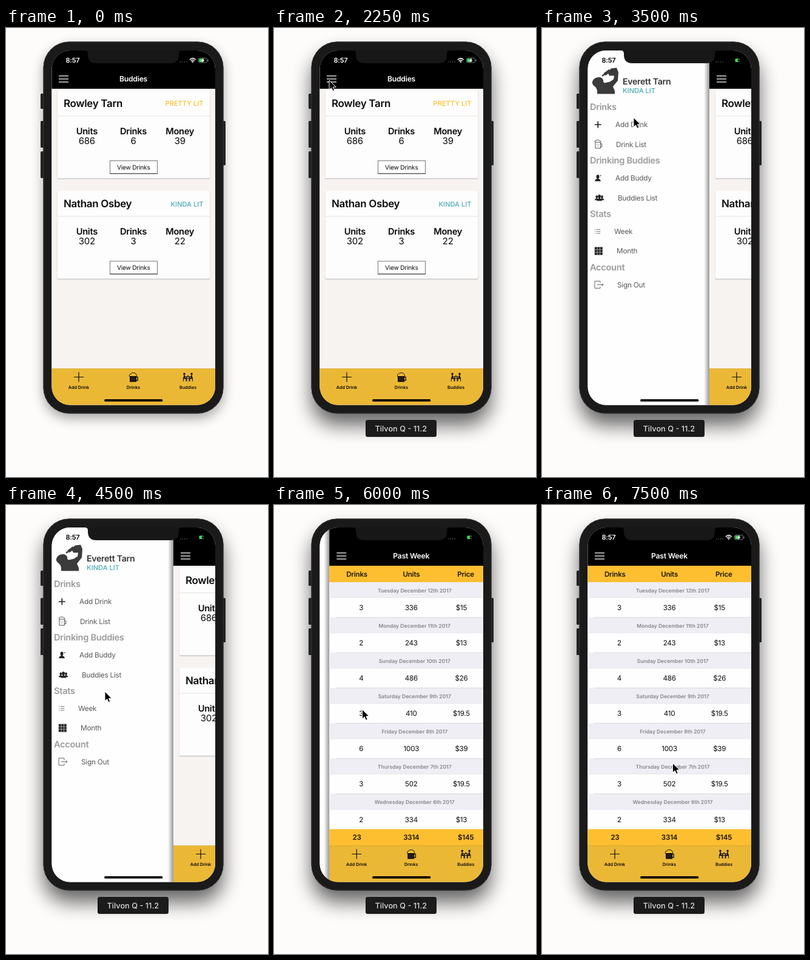
An HTML page for the animation above (8 s loop, 432 by 739 pixels).

```html
<!DOCTYPE html>
<html lang="en">
<head>
<meta charset="utf-8">
<title>Drinks tracker</title>
<style>
html, body { margin: 0; width: 100%; height: 100%; overflow: hidden; background: #fefcfb; }
svg { display: block; width: 100vw; height: 100vh; }
text { font-family: Inter, "Open Sans", sans-serif; text-rendering: geometricPrecision; white-space: pre; }
</style>
</head>
<body>
<svg id="stage" viewBox="0 0 432 739"></svg>
<script>
const LOOP = 8000, STEP = 250, OPEN = 201;
const YELLOW = '#fdbf2f', TAB = '#ebb836', TEAL = '#4bacb4', GREY = '#9b9b9b';

const text = (x, y, size, str, o = {}) =>
  `<text x="${x}" y="${y}" font-size="${size}" font-weight="${o.w || 400}" fill="${o.fill || '#0a0a0a'}"` +
  ` text-anchor="${o.at || 'start'}" letter-spacing="${o.ls ?? -0.02 * size}">${str}</text>`;
const mid = (x, y, size, str, o = {}) => text(x, y, size, str, { at: 'middle', ...o });
const rect = (x, y, w, h, fill, r = 0, more = '') =>
  `<rect x="${x}" y="${y}" width="${w}" height="${h}" rx="${r}" fill="${fill}" ${more}/>`;
const line = (d, color, w = 1, more = '') =>
  `<path d="${d}" fill="none" stroke="${color}" stroke-width="${w}" ${more}/>`;
const shape = (d, fill = '#111') => `<path d="${d}" fill="${fill}"/>`;
const dot = (x, y, r, fill = '#111') => `<circle cx="${x}" cy="${y}" r="${r}" fill="${fill}"/>`;
const group = (id, body, more = '') => `<g id="${id}" ${more}>${body}</g>`;

// Main pages
const header = title => rect(75, 36, 271, 64, '#000') +
  line('M87 78.8h16M87 83.8h16M87 88.8h16', '#fff', 1.3) +
  mid(210, 88.2, 12.2, title, { w: 600, fill: '#fff' });

function card(y, name, state, color, values) {
  const cols = ['Units', 'Drinks', 'Money'].map((label, i) => {
    const x = 133.3 + i * 76.7;
    return mid(x, 72, 14.7, label, { w: 600 }) + mid(x, 87.5, 15, values[i]);
  }).join('');
  return `<g transform="translate(0 ${y})">` +
    rect(84, 0.5, 253, 145, '#000', 1, 'opacity=".06"') +
    rect(85, 1, 251, 145, '#000', 1, 'opacity=".12"') +
    rect(85, 0, 251, 144.3, '#fefdfd', 1) +
    line('M85 41.7h251', '#e4e1e0') +
    text(95, 27.2, 17, name, { w: 600 }) +
    text(325.5, 25.3, 11.1, state, { w: 500, fill: color, at: 'end', ls: 0 }) + cols +
    rect(171.5, 115.5, 78, 21, '#fefefe', 0, 'stroke="#777" stroke-width="1"') +
    line('M171 136.7h79', '#444', 1.2) +
    mid(210.3, 130, 10.1, 'View Drinks') + '</g>';
}

const tabMug = shape('M204 573h11v9.5h-11z') +
  line('M215 574.5h2.2v5.5h-2.2', '#111', 1.3) +
  line('M203.8 573.5q-1.5-4 2-4 1.5-3 4-1.8 3-1 3.5 1.3 3 .5 1.7 4.5z', '#111', 1) +
  line('M207 575v5.5M209.7 575v5.5M212.4 575v5.5', '#5b4a18', 0.7);
const tabPeople = dot(294, 569.3, 1.7) + dot(306, 569.3, 1.7) +
  line('M294 571.5v5h3.5v5M306 571.5v5h-3.5v5', '#111', 2) +
  line('M294 573l4 1.5 2-2 2 2 4-1.5', '#111', 1.3) +
  line('M292.4 575v6.5M307.6 575v6.5M298 576.5h4', '#111', 1);
const tabs = rect(75, 560.5, 271, 62, TAB) + line('M75 560.7h271', '#c99f35', 0.5) +
  line('M112 574.5h16M120 566.5v16', '#111', 1.2) + tabMug + tabPeople +
  ['Add Drink', 'Drinks', 'Buddies'].map((s, i) =>
    mid(120 + i * 90, 593.6, 7.2, s, { w: 600, ls: 0 })).join('');

const buddies = rect(75, 99, 271, 462, '#f7f3f1') +
  card(103, 'Rowley Tarn', 'PRETTY LIT', YELLOW, [686, 6, 39]) +
  card(268.3, 'Nathan Osbey', 'KINDA LIT', TEAL, [302, 3, 22]) + header('Buddies');

const days = [
  ['Tuesday December 12th', 3, 336, 15], ['Monday December 11th', 2, 243, 13],
  ['Sunday December 10th', 4, 486, 26], ['Saturday December 9th', 3, 410, 19.5],
  ['Friday December 8th', 6, 1003, 39], ['Thursday December 7th', 3, 502, 19.5],
  ['Wednesday December 6th', 2, 334, 13]
];
const totals = (y, cells) => cells.map((s, i) =>
  mid(120.3 + i * 89.8, y, 11.6, s, { w: 600, fill: '#1c1608' })).join('');
const week = rect(75, 99, 271, 462, '#fefefe') + rect(75, 100, 271, 27, YELLOW) +
  totals(117.8, ['Drinks', 'Units', 'Price']) +
  days.map(([day, drinks, units, price], i) => {
    const y = 127 + i * 58.05;
    return rect(75, y, 271, 26, '#efeef5') + line(`M75 ${y + 25.5}h271`, '#e6e5ec', 0.8) +
      (i ? line(`M86 ${y}h260`, '#cfced6', 0.8) : '') +
      mid(215.5, y + 16.6, 8.6, day + ' 2017', { w: 600, fill: '#858589', ls: 0 }) +
      [drinks, units, '$' + price].map((s, k) => mid(127.5 + k * 82.6, y + 46.2, 11.6, s)).join('');
  }).join('') +
  rect(75, 533.5, 271, 27.5, YELLOW) + totals(551.3, [23, 3314, '$145']) + header('Past Week');

// Side menu
const INK = '#3b3b3b';
const drinker = `<ellipse cx="92" cy="88.5" rx="9.5" ry="7.2" fill="${INK}" transform="rotate(-22 92 88.5)"/>` +
  shape('M91 108.5v-5q-1-6-6-9l13-9 5 5 9-2 6-4 1-6-8 0-3-6 6-6 9-1 3 7-1 14-8 10 3 7v5z', INK) +
  line('M99 79l5-3.5', INK, 2.2) + line('M103 76.5l9-6.5', INK, 5);
const person = (x, y, s) => `<g transform="translate(${x} ${y}) scale(${s})">` +
  `<ellipse cy="-2.5" rx="2.6" ry="3.2" fill="#222"/>` +
  shape('M-5 5.5q0-3.5 3.7-4.2v-2h2.6v2q3.7.7 3.7 4.2z', '#222') + '</g>';
const icons = {
  plus: line('M86.8 159h11M92.3 153.5v11', '#222', 1.7),
  mug: line('M88 188h8.5v10h-8.5zM96.5 190.5h2.3v5h-2.3M87.5 188q-1-3 1.5-3 3-2 5 0 3.5 0 2.7 3', '#555', 1) +
    line('M90.8 191v1.5M93.7 191v1.5M92.2 193.5v2', '#777', 0.9),
  buddy: person(92, 247, 0.95) + line('M95.5 243h2.5', '#222', 1),
  group: person(90.3, 279.5, 0.7) + person(99, 279.5, 0.7) + person(94.6, 279.5, 0.9),
  list: line('M87 331.5h1.3M87 334.8h1.3M87 338h1.3M89.8 331.5h6.5M89.8 334.8h6.5M89.8 338h6.5', '#666', 0.9),
  grid: rect(86.8, 360.5, 13, 13, '#222') +
    line('M91.2 360.5v13M95.5 360.5v13M86.8 364.8h13M86.8 369.2h13', '#bbb', 0.8),
  exit: line('M96 419.5v-2.8h-9v11.6h9v-2.8M91 422.5h10M98.5 420l2.5 2.5-2.5 2.5', '#555', 0.9)
};
const section = (y, s) => text(79, y, 14.6, s, { w: 600, fill: GREY });
const item = (x, y, s, icon) => icons[icon] + text(x, y, 11.8, s, { fill: '#5a5a5a' });
const menu = rect(75, 36, OPEN + 1, 586, '#fefefe') + drinker +
  text(133, 92.7, 14.1, 'Everett Tarn', { w: 600, fill: '#333' }) +
  text(133, 107.2, 11.1, 'KINDA LIT', { w: 500, fill: TEAL, ls: 0 }) +
  section(135.3, 'Drinks') + item(121, 163.3, 'Add Drink', 'plus') + item(122, 195.6, 'Drink List', 'mug') +
  section(223, 'Drinking Buddies') + item(121, 251.3, 'Add Buddy', 'buddy') + item(125, 283.6, 'Buddies List', 'group') +
  section(310.7, 'Stats') + group('weekItem', item(119, 339.1, 'Week', 'list')) + item(123, 371.3, 'Month', 'grid') +
  section(398.5, 'Account') + item(124, 426.6, 'Sign Out', 'exit');

// Phone
const status = mid(110, 57, 11, '8:57', { w: 600, fill: 'currentColor', ls: -0.1 }) +
  [287.5, 291, 294.5, 298].map(x => dot(x, 55.7, 0.8, '#666')).join('') +
  line('M302.8 52.2q5-4.6 10 0M304.7 54.2q3.1-2.8 6.2 0', 'currentColor', 1.5) +
  shape('M305.9 55.3q1.9-1.5 3.8 0l-1.9 2z', 'currentColor') +
  rect(317.5, 49.5, 14, 7.5, 'none', 2, 'stroke="currentColor" stroke-width=".8" opacity=".55"') +
  rect(332.5, 51.8, 1.2, 3, 'currentColor', 0.6, 'opacity=".55"') +
  rect(318.5, 50.5, 7.5, 5.5, '#4cd964', 1) +
  shape('M326 49.8l-4.5 4h2.5l-1 3.2 4.7-4.2h-2.7z', 'currentColor');
const notch = shape('M130 36h160v1q-5 0-5 5v2q0 14-14 14h-122q-14 0-14-14v-2q0-5-5-5z', '#171717');
const buttons = rect(57, 108, 8, 25, '#222', 1.5) + rect(57, 153, 8, 44, '#222', 1.5) +
  rect(57, 203, 8, 44, '#222', 1.5) + rect(354, 153, 8, 73, '#222', 1.5);
const shadow = (id, dy, blur, alpha) => rect(62, 23 + dy, 296, 611, '#000', 42,
  `id="${id}" opacity="${alpha}" style="filter:blur(${blur}px)"`);

const stage = document.getElementById('stage');
stage.innerHTML =
  `<defs><clipPath id="screen"><rect x="75.5" y="37" width="269.5" height="583.5" rx="30"/></clipPath>
  <linearGradient id="edge"><stop offset="0" stop-opacity="0"/><stop offset="1" stop-opacity=".42"/></linearGradient></defs>` +
  rect(0, 0, 432, 739, '#fefcfb') +
  shadow('idleShadow', 8, 10, 0.36) + shadow('focusShadow', 20, 16, 0.6) + buttons +
  rect(61.5, 22.5, 297, 612, '#1a1a1a', 42.5) +
  rect(62, 23, 296, 611, 'none', 42, 'stroke="#333" stroke-width="1"') +
  `<g clip-path="url(#screen)">` + rect(75, 36, 271, 586, '#fefefe') + group('menu', menu) +
  group('main', rect(66, 36, 9.5, 586, 'url(#edge)') +
    group('buddies', buddies) + group('week', week) + tabs) +
  notch + group('status', status) + rect(162.1, 611.1, 96.3, 3.7, '#000', 1.85) + '</g>' +
  group('label', rect(151, 645, 117, 28, '#1b1b1b', 3.5) +
    mid(209.3, 664.3, 12.8, 'Tilvon Q - 11.2', { w: 500, fill: '#dcdcdc', ls: 0 })) +
  group('cursor', `<path d="M0 0V15.5L3.7 12.2 6 17.6 8.7 16.5 6.4 11.2H11.3Z" fill="#000" stroke="#fff" stroke-width="1" stroke-linejoin="round"/>`);

const el = id => document.getElementById(id);
const show = (id, on) => el(id).setAttribute('display', on ? 'inline' : 'none');
const move = (id, x, y = 0) => el(id).setAttribute('transform', `translate(${x} ${y})`);

// Eased drawer slide; p runs from 0 to 1
const SLIDE = 309;
const ease = p => { p = Math.min(1, Math.max(0, p)); return p * p * (3 - 2 * p); };
const drawer = t => OPEN * (ease((t - 2270) / SLIDE) - ease((t - 5745) / SLIDE));

// Cursor stops: time, x, y
const path = [[750, 214, 49], [1000, 170, 62], [1250, 103, 86], [1500, 91.5, 91.5], [1750, 86.5, 89],
  [2000, 91, 86], [2750, 91, 86], [3250, 118, 112], [3500, 151, 147.5], [4000, 160, 220],
  [4500, 163, 307], [4750, 145.5, 336.5], [6500, 145.5, 336.5], [7500, 215.5, 425]];
function cursorAt(t) {
  const i = path.findIndex(k => k[0] >= t);
  if (i < 1) return (i ? path[path.length - 1] : path[0]).slice(1);
  const [t0, x0, y0] = path[i - 1], [t1, x1, y1] = path[i], p = (t - t0) / (t1 - t0);
  return [x0 + (x1 - x0) * p, y0 + (y1 - y0) * p];
}

function draw(now) {
  const t = Math.floor(now % LOOP / STEP) * STEP;
  const x = drawer(t), focused = t >= 2250, onWeek = t >= 5750;
  move('main', x);
  move('menu', x - OPEN);
  move('cursor', ...cursorAt(t));
  show('label', t >= 500);
  show('cursor', t >= 500);
  show('idleShadow', !focused);
  show('focusShadow', focused);
  show('buddies', !onWeek);
  show('week', onWeek);
  el('weekItem').setAttribute('opacity', t === 5500 ? 0.42 : 1);
  el('status').style.color = t >= 2750 && t < 6250 ? '#000' : '#fff';
}

function tick(now) {
  draw(now);
  requestAnimationFrame(tick);
}
draw(0);
requestAnimationFrame(tick);
</script>
</body>
</html>
```
